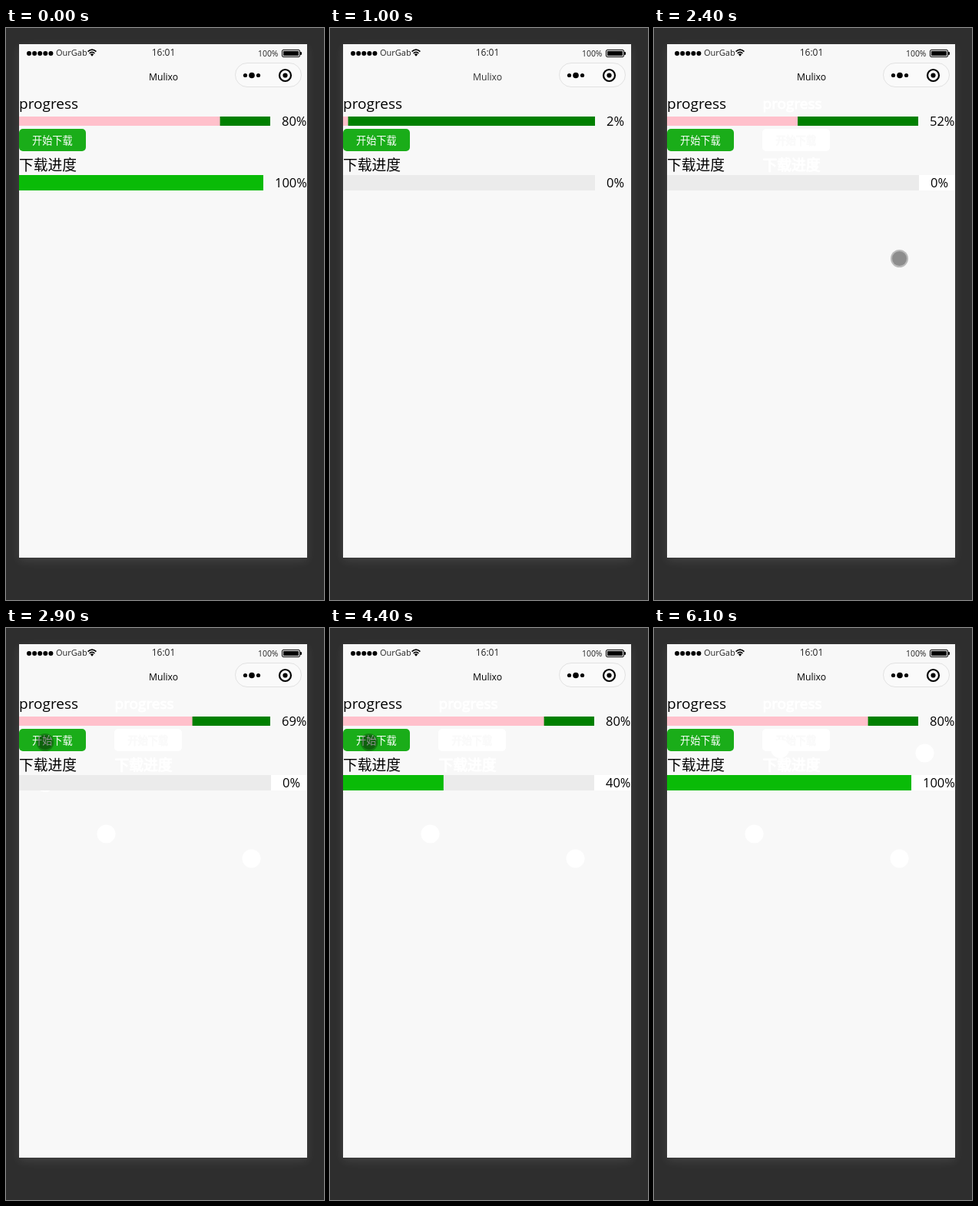
Animation, 414 px wide and 743 px high, one loop 6600 ms. Source, as an HTML page:

```html
<!DOCTYPE html>
<html lang="zh-CN">
<head>
<meta charset="utf-8">
<title>progress</title>
<style>
  html, body { margin: 0; width: 100%; height: 100%; overflow: hidden; background: #2e2e2e; }
  #phone { position: absolute; left: 17px; top: 21px; width: 375px; height: 667px;
    background: #f8f8f8; box-shadow: 0 4px 12px rgba(255, 255, 255, .1); }
  svg { position: absolute; left: 0; top: 0; display: block; }
  text { font-family: "Open Sans", "Noto Sans", "Noto Sans CJK SC", sans-serif; }
  .cjk { font-family: "Noto Sans CJK SC", "Noto Sans CJK", sans-serif; }
  .heading { font-size: 19px; }
  .label { font-size: 18.75px; }
  .action { font-size: 13.2px; }
  .percent { font-size: 16.5px; }
  .trace { fill: #fff; }
  .trace text { stroke: #fff; stroke-width: 1px; }
  .trace .action { fill: #f8f8f8; stroke: #fafafa; }
</style>
</head>
<body>
<div id="phone"></div>
<svg width="414" height="743" viewBox="0 0 414 743">
  <defs><clipPath id="screen"><rect x="17" y="21" width="375" height="667"/></clipPath></defs>

  <g id="status">
    <g id="signal"></g>
    <text x="65" y="36" font-size="11" fill="#222">OurGab</text>
    <g fill="none" stroke="#000" stroke-width="1.7">
      <path d="M106.6 30.6Q112 25.6 117.4 30.6M108.6 33Q112 29.8 115.4 33"/>
      <path d="M109.8 34.2Q112 32.4 114.2 34.2L112 36.8Z" fill="#000" stroke="none"/>
    </g>
    <text x="205" y="36" font-size="12" text-anchor="middle" fill="#222">16:01</text>
    <text x="328" y="37" font-size="10.4" fill="#222">100%</text>
    <rect x="359.5" y="28.5" width="23" height="9" rx="1.5" fill="none" stroke="#000"/>
    <rect x="361" y="30" width="20" height="6"/>
    <rect x="383" y="31" width="2" height="4" rx="1"/>
  </g>

  <text id="title" x="205" y="68" font-size="12.2" text-anchor="middle">Mulixo</text>
  <rect x="298.5" y="45.5" width="86" height="31" rx="15.5" fill="#fafafa" stroke="#e2e2e2"/>
  <circle cx="311.5" cy="61.5" r="2.6"/>
  <circle cx="320" cy="61.5" r="3.8"/>
  <circle cx="328.5" cy="61.5" r="2.6"/>
  <circle cx="363.5" cy="61.5" r="7.5" fill="none" stroke="#000" stroke-width="2.2"/>
  <circle cx="363.5" cy="61.5" r="3.1"/>

  <g class="trace" id="pageTrace">
    <text class="heading" x="141.5" y="105">progress</text>
    <rect x="141" y="131" width="88" height="29" rx="5"/>
    <text class="action cjk" x="158.5" y="151">开始下载</text>
    <text class="label cjk" x="141.5" y="185">下载进度</text>
  </g>
  <g class="trace" id="dotTraces"></g>

  <g clip-path="url(#screen)">
    <g id="page">
      <text class="heading" x="17" y="105">progress</text>
      <g id="topBar"></g>
      <rect id="button" x="17" y="131" width="87" height="29" rx="5"/>
      <text id="buttonText" class="action cjk" x="34" y="151" fill="#fff">开始下载</text>
      <text class="label cjk" x="17" y="185">下载进度</text>
      <g id="downloadBar"></g>
    </g>
  </g>

  <g id="pointer">
    <circle r="11.5" fill="#000" fill-opacity=".25"/>
    <circle r="9.5" fill="#000" fill-opacity=".24"/>
  </g>
</svg>
<script>
const LOOP = 6600, STEP = 100, LEFT = 17, RIGHT = 392;
const $ = id => document.getElementById(id);

function add(parent, tag, attrs) {
  const node = document.createElementNS('http://www.w3.org/2000/svg', tag);
  set(node, attrs);
  parent.append(node);
  return node;
}
function set(node, attrs) {
  for (const key in attrs) node.setAttribute(key, attrs[key]);
}
const show = (node, on) => { node.style.display = on ? '' : 'none'; };
const between = (t, from, to) => t >= from && t < to;

for (let i = 0; i < 5; i++) add($('signal'), 'circle', { cx: 30 + i * 7.1, cy: 33, r: 3 });

function makeBar(group, y, height, track, fill) {
  const box = { y, height };
  const backing = add(group, 'rect', { ...box, fill: '#fff' });
  const rail = add(group, 'rect', { ...box, x: LEFT, fill: track });
  const done = add(group, 'rect', { ...box, x: LEFT, fill });
  const label = add(group, 'text', { class: 'percent', y: y + height / 2 + 6 });
  return (value, whiteBacking) => {
    const end = value < 10 ? 345 : value < 100 ? 344 : 335;
    set(backing, { x: end, width: RIGHT - end });
    show(backing, whiteBacking);
    set(rail, { width: end - LEFT });
    set(done, { width: (end - LEFT) * value / 100 });
    set(label, { x: end + 15 });
    label.textContent = value + '%';
  };
}
const drawTop = makeBar($('topBar'), 115, 12, 'green', 'pink');
const drawDownload = makeBar($('downloadBar'), 191, 20, '#ebebeb', '#09bb07');

// [time, x, y]; a missing position hides the pointer
const pointerPath = [
  [0], [2300, 404, 296], [2400, 319.5, 299.5], [2500, 130.5, 267.5],
  [2600, 51, 201], [2700, 51, 148.5], [5000, 164, 157], [5100, 352.5, 162.5], [5200]
];
// [x, y, from, to]
const dotTraces = [
  [319.5, 299.5, 2500, LOOP], [130.5, 267.5, 2600, LOOP], [51, 201, 2700, 3500],
  [164, 157, 5100, LOOP], [352.5, 162.5, 5200, LOOP]
].map(([cx, cy, from, to]) => ({ node: add($('dotTraces'), 'circle', { cx, cy, r: 12 }), from, to }));

function ramp(t, start, first, rate, last) {
  return Math.min(last, Math.round(first + (t - start) / STEP * rate));
}

function draw(t) {
  const blank = between(t, 800, 1000);
  const sliding = between(t, 1100, 1200);
  const settled = t >= 1200;
  const pressed = between(t, 3400, 3500);

  show($('page'), !blank);
  show($('title'), !blank);
  set($('title'), { opacity: between(t, 1000, 1100) ? 0.8 : 1 });
  set($('page'), { transform: `translate(${sliding ? 124.5 : 0} 0)` });

  drawTop(t < 1000 ? 80 : ramp(t, 1000, 2, 3.545, 80), false);
  drawDownload(t < 1000 ? 100 : t < 3400 ? 0 : ramp(t, 3400, 3, 3.65, 100), settled);
  set($('button'), { fill: pressed ? '#179b16' : '#1aad19' });
  set($('buttonText'), { opacity: pressed ? 0.6 : 1 });

  show($('pageTrace'), settled);
  for (const { node, from, to } of dotTraces) show(node, between(t, from, to));

  const [, x, y] = pointerPath.filter(p => p[0] <= t).pop();
  show($('pointer'), x !== undefined);
  if (x !== undefined) set($('pointer'), { transform: `translate(${x} ${y})` });
}

function tick() {
  draw(Math.floor(performance.now() % LOOP / STEP) * STEP);
  requestAnimationFrame(tick);
}
tick();
</script>
</body>
</html>
```
